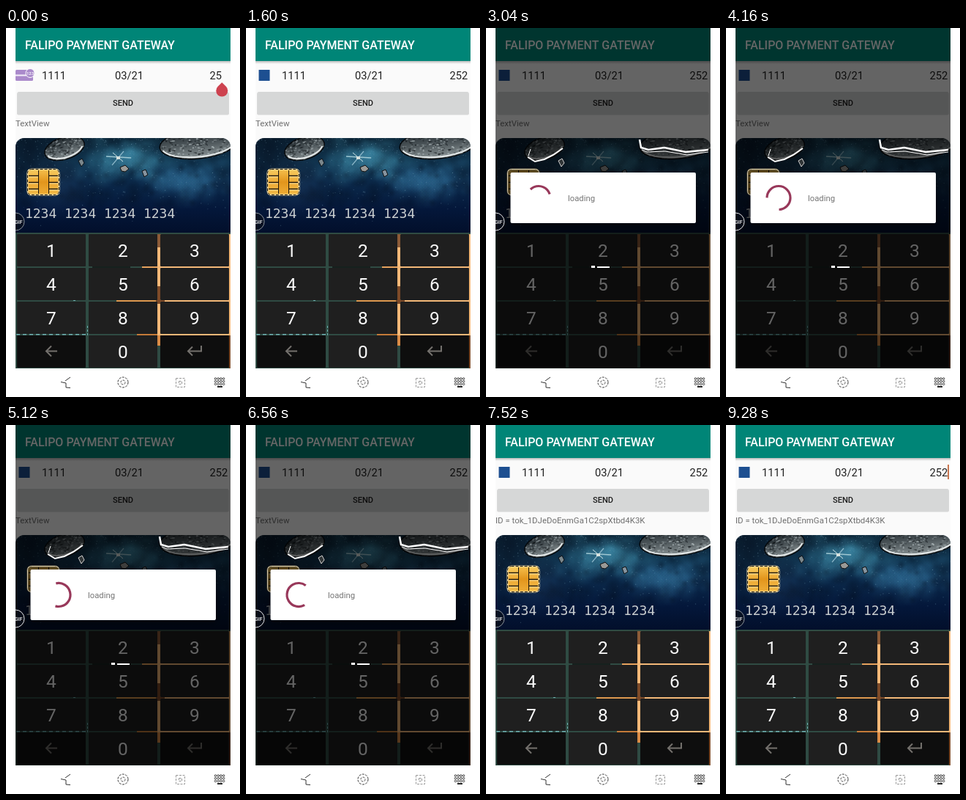
These frames come from a looping animation (320 px wide and 503 px high, 9600 ms). An HTML page with a canvas:

```html
<!DOCTYPE html>
<html lang="en">
<head>
<meta charset="utf-8">
<title>Payment gateway demo</title>
<style>
html, body { margin: 0; width: 100%; height: 100%; overflow: hidden; background: #fff; }
canvas { display: block; width: 320px; height: 503px; }
</style>
</head>
<body>
<canvas id="stage" width="320" height="503"></canvas>
<script>
const ctx = document.getElementById('stage').getContext('2d');
const LOOP = 9600, STEP = 160;
const SPIN_START = 2120, TYPED = 1120, SENT = 2240, DONE = 7200;
const LEFT = 13, WIDTH = 294;
const clamp = v => Math.max(0, Math.min(1, v));

function rect(x, y, w, h, fill, radius = 0) {
  ctx.fillStyle = fill;
  ctx.beginPath();
  ctx.roundRect(x, y, w, h, radius);
  ctx.fill();
}

function text(str, x, y, size, color, { weight = 400, align = 'left', family = 'Roboto, sans-serif' } = {}) {
  ctx.font = `${weight} ${size}px ${family}`;
  ctx.textAlign = align;
  ctx.fillStyle = color;
  ctx.fillText(str, x, y);
}

function trace(points, close) {
  ctx.beginPath();
  points.forEach(([x, y]) => ctx.lineTo(x, y));
  if (close) ctx.closePath();
}

function line(points, color, width = 1, close = false) {
  trace(points, close);
  ctx.strokeStyle = color;
  ctx.lineWidth = width;
  ctx.stroke();
}

function shape(points, fill, outline) {
  trace(points, true);
  ctx.fillStyle = fill;
  ctx.fill();
  ctx.strokeStyle = outline;
  ctx.lineWidth = 1;
  ctx.stroke();
}

function ring(x, y, r, color, width = 1) {
  ctx.beginPath();
  ctx.arc(x, y, r, 0, Math.PI * 2);
  ctx.strokeStyle = color;
  ctx.lineWidth = width;
  ctx.stroke();
}

function glow(x, y, r, rgb, alpha) {
  const g = ctx.createRadialGradient(x, y, 0, x, y, r);
  g.addColorStop(0, `rgba(${rgb},${alpha})`);
  g.addColorStop(1, `rgba(${rgb},0)`);
  ctx.fillStyle = g;
  ctx.fillRect(x - r, y - r, 2 * r, 2 * r);
}

function vertical(y0, y1, ...colors) {
  const g = ctx.createLinearGradient(0, y0, 0, y1);
  colors.forEach((c, i) => g.addColorStop(i / (colors.length - 1), c));
  return g;
}

function randomizer(seed) {
  return () => (seed = (seed * 16807) % 2147483647) / 2147483647;
}

function drawHeader() {
  rect(LEFT, 0, WIDTH, 464, '#fafafa');
  rect(LEFT, 45, WIDTH, 4, vertical(45, 49, 'rgba(0,0,0,.25)', 'rgba(0,0,0,0)'));
  rect(LEFT, 0, WIDTH, 45, '#008577');
  text('FALIPO PAYMENT GATEWAY', 26, 29, 16, '#fff', { weight: 500 });
}

function drawForm(t) {
  const typed = t >= TYPED;
  if (typed) {
    rect(17.5, 57, 15, 15, '#1d4f91');
  } else {
    rect(13, 57, 24, 15, '#aa8acb', 1.5);
    rect(13, 63.5, 15, 2, '#f3eef8');
    ctx.beginPath();
    ctx.arc(33, 61.5, 6, 0, Math.PI * 2);
    ctx.fillStyle = '#aa8acb';
    ctx.fill();
    ring(33, 61.5, 6, '#fff');
    text('123', 33, 63.5, 6, '#fff', { align: 'center', weight: 500 });
  }
  text('1111', 49, 70, 14.7, '#212121');
  text('03/21', 149, 70, 14.7, '#212121');
  text(typed ? '252' : '25', 278.5, 70, 14.7, '#212121');

  rect(15, 88, 290, 30.5, 'rgba(0,0,0,.14)', 2);
  rect(15.5, 87, 289, 30.5, '#d6d7d7', 2);
  text('SEND', 160, 106, 11.1, '#1e1e1e', { weight: 500, align: 'center' });
  text(t >= DONE ? 'ID = tok_1DJeDoEnmGa1C2spXtbd4K3K' : 'TextView', 13, 134, 11.45, '#707070');

  const early = t >= 480 && t < TYPED;
  const late = (t >= TYPED && t < 1600) || (t >= 8160 && t < 8800) || t >= 9280;
  if (early) rect(295, 54, 1.5, 20, '#cd424f');
  if (late) rect(303, 54, 2, 20, '#c8754f');
  if (!typed) {
    ctx.beginPath();
    ctx.arc(295.3, 85.5, 8, -Math.PI / 4, Math.PI * 5 / 4);
    ctx.lineTo(295.3, 74.2);
    ctx.fillStyle = '#cd424f';
    ctx.fill();
  }
}

const smallRock = [[99, 181], [104, 178], [107, 184], [103, 189]];

function drawNebula() {
  rect(LEFT, 150, WIDTH, 129, vertical(150, 279, '#0c2638', '#103550', '#0a2748', '#04173a', '#020f2b'));
  const rnd = randomizer(71);
  const spread = () => (rnd() + rnd() + rnd()) / 1.5 - 1;
  for (let i = 0; i < 120; i++) {
    glow(165 + spread() * 80, 183 + spread() * 38, 5 + rnd() * 13, '70,155,185', .05 + rnd() * .13);
    glow(245 + spread() * 75, 208 + spread() * 34, 5 + rnd() * 13, '55,125,170', .04 + rnd() * .1);
    glow(LEFT + rnd() * WIDTH, 150 + rnd() * 90, 4 + rnd() * 12, '3,14,30', .1 + rnd() * .25);
  }
  glow(30, 170, 75, '6,16,32', .65);
  glow(70, 215, 50, '40,70,110', .3);
  for (let i = 0; i < 520; i++) {
    const x = LEFT + rnd() * WIDTH, y = 150 + rnd() * rnd() * 125;
    rect(x, y, 1, 1, `rgba(150,195,215,${rnd() * .45})`);
  }
}

function drawAsteroid(x, y, rx, ry, tilt, seed) {
  const rnd = randomizer(seed);
  ctx.save();
  ctx.translate(x, y);
  ctx.rotate(tilt);
  ctx.beginPath();
  ctx.ellipse(0, 0, rx, ry, 0, 0, Math.PI * 2);
  ctx.fillStyle = vertical(-ry, ry, '#20282d', '#4e575b', '#8d9698');
  ctx.fill();
  ctx.strokeStyle = '#05080b';
  ctx.lineWidth = 1.5;
  ctx.stroke();
  ctx.clip();
  for (let i = 0; i < rx * 6; i++) {
    const shade = rnd() < .45 ? '8,12,15' : '185,195,198';
    rect((rnd() * 2 - 1) * rx, (rnd() * 2 - 1) * ry, 1 + rnd() * 3, 1 + rnd(), `rgba(${shade},${.2 + rnd() * .5})`);
  }
  ctx.beginPath();
  ctx.ellipse(0, 0, rx - 2.5, ry - 2.5, 0, .35, 2.9);
  ctx.strokeStyle = '#e4e8e8';
  ctx.lineWidth = 2;
  ctx.stroke();
  ctx.restore();
}

function drawChipEdge(color, width = 1) {
  ctx.beginPath();
  ctx.roundRect(29.5, 192.5, 43, 35, 5);
  ctx.strokeStyle = color;
  ctx.lineWidth = width;
  ctx.stroke();
}

function drawChip() {
  rect(29, 192, 44, 36, vertical(192, 228, '#f8cd62', '#eeaa34', '#f2ba48'), 5);
  rect(44, 194, 14, 32, vertical(194, 226, '#f4bd4a', '#e2951c', '#edab35'), 2);
  for (const y of [201.5, 210.5, 219.5]) {
    for (const x of [31, 58]) {
      line([[x, y], [x + 13, y]], '#1c150b', 1.3);
      line([[x, y + 1.5], [x + 13, y + 1.5]], '#fbe3a0');
    }
  }
  line([[44.5, 194], [44.5, 226]], '#1c150b');
  line([[58.5, 194], [58.5, 226]], '#1c150b');
  drawChipEdge('#f7e3ae', 2);
  ctx.setLineDash([4, 2]);
  drawChipEdge('#17130c');
  ctx.setLineDash([]);
}

function drawCard() {
  ctx.save();
  ctx.beginPath();
  ctx.roundRect(LEFT, 150, WIDTH, 129, [12, 12, 0, 0]);
  ctx.clip();
  drawNebula();
  drawAsteroid(80, 164, 28, 15, -.3, 5);
  drawAsteroid(263, 158, 53, 20, -.1, 9);
  shape(smallRock, '#7b878c', '#0a0f14');
  shape([[156, 190], [163, 187], [168, 192], [163, 196], [158, 195]], '#9a9a97', '#111');
  shape([[186, 195], [191, 193], [194, 200], [189, 203]], '#8795a0', '#111');
  line([[137, 175], [171, 177]], '#9ec7d2', 1.6);
  line([[145, 187], [161, 168]], '#8ab6c8', 1.2);
  line([[146, 170], [160, 182]], '#cfe4e7');
  rect(151, 175, 5, 4, '#d7e2df');
  drawChip();
  text('1234 1234 1234 1234', 26, 258.5, 17.95, '#c9cdcf', { family: '"DejaVu Sans Mono", monospace' });
  ctx.restore();
}

function drawBackdrop() {
  const warm = '#f3b878', brown = '#7d4a28';
  rect(LEFT, 279, WIDTH, 185, '#2f4b43');
  rect(207, 281, 100, 138, warm);
  rect(207, 281, 4, 18, '#8c5b38');
  rect(207, 352, 4, 24, brown);
  rect(207, 419, 4, 14, '#d98b46');
  rect(305, 419, 2, 45, brown);
  rect(186, 325, 21, 2, '#e6a25e');
  rect(151, 371, 56, 2, '#dd994f');
  rect(179, 417, 28, 2, '#c47a38');
  rect(205, 371, 12, 2, brown);
  rect(118, 325, 52, 2, '#16211e');
  for (let x = 14; x < 112; x += 9) rect(x, 417, 5, 1.5, '#6fb0b2');
  for (let y = 406; y < 417; y += 5) rect(111, y, 1, 3, '#6fb0b2');
  rect(92, 371, 3, 1, '#6fb0b2');
}

function drawKeypad(t) {
  drawBackdrop();
  const flash = t >= TYPED && t < 1600 ? .2 * (1 - (t - TYPED) / 480) : 0;
  [...'123456789 0 '].forEach((label, i) => {
    const x = 15 + (i % 3) * 98, y = 281 + Math.floor(i / 3) * 46;
    const blank = label === ' ';
    rect(x, y, 94, 44, blank ? '#0e0e0e' : '#1f1f1f', 1);
    if (label === '2' && flash) rect(x, y, 94, 44, `rgba(255,255,255,${flash})`, 1);
    if (!blank) text(label, x + 47, y + 31, 24.5, '#fafafa', { align: 'center' });
  });
  line([[70, 440.5], [55, 440.5]], '#74716d', 2);
  line([[62, 433.5], [55, 440.5], [62, 447.5]], '#74716d', 2);
  line([[267, 433], [267, 440.5], [249, 440.5]], '#74716d', 2);
  line([[255, 434.5], [249, 440.5], [255, 446.5]], '#74716d', 2);
}

function drawNavigation() {
  line([[75, 482.5], [82, 484], [82, 490], [88, 490.5]], '#333');
  line([[81, 481], [88, 476]], '#333');
  ctx.setLineDash([3, 1.5]);
  ring(160, 483, 7, '#333');
  ring(160, 483, 3, '#444');
  ctx.strokeStyle = '#999';
  ctx.strokeRect(232.5, 477.5, 12, 12);
  ctx.strokeRect(236.5, 481.5, 4, 4);
  ctx.setLineDash([]);
  for (let row = 0; row < 3; row++) {
    for (let col = 0; col < 4; col++) ring(286.5 + col * 3.7, 478 + row * 3.7, 1.3, '#222', .8);
  }
  rect(289, 488, 7, 2, '#222');
}

function drawBadge(dim) {
  ctx.save();
  ctx.beginPath();
  ctx.rect(LEFT, 245, 20, 35);
  ctx.clip();
  ctx.beginPath();
  ctx.arc(13, 264, 12, 0, Math.PI * 2);
  ctx.fillStyle = 'rgba(10,16,26,.65)';
  ctx.fill();
  ring(13, 264, 12, dim > .4 ? '#e8e8e8' : '#8b9299');
  text('GIF', 12, 266.5, 7, '#eee', { weight: 500 });
  ctx.restore();
}

// Edges that stay bright while the window is dimmed.
function drawHighlights() {
  line([[57, 176], [67, 182], [80, 179], [92, 173], [105, 164]], '#fff', 2);
  line([[61, 165], [58, 174]], '#fff');
  line([[210, 152], [212, 163], [222, 166], [244, 163], [273, 169], [304, 166]], '#fff', 2.5);
  line([[213, 166], [220, 169], [245, 168], [275, 173], [304, 169]], '#fff');
  line(smallRock, '#ddd', 1, true);
  drawChipEdge('#e8d9b5');
  rect(144, 324, 5, 3, '#fff');
  rect(152, 325, 17, 2, '#fff');
}

// Standard "fast out, slow in" curve: cubic-bezier(.4, 0, .2, 1).
function ease(x) {
  let low = 0, high = 1;
  for (let i = 0; i < 20; i++) {
    const s = (low + high) / 2;
    const bx = 1.2 * s * (1 - s) ** 2 + .6 * s * s * (1 - s) + s ** 3;
    if (bx < x) low = s; else high = s;
  }
  return 3 * low * low - 2 * low ** 3;
}

function drawSpinner(t) {
  const elapsed = t - SPIN_START;
  const phase = (elapsed / 1333) % 1;
  const tail = .75 * ease(clamp(phase * 2 - 1));
  const head = .75 * ease(clamp(phase * 2));
  const turn = elapsed * 2 / 6665 + phase * .25 - .25;
  ctx.beginPath();
  ctx.arc(72, 231.5, 16, (turn + tail) * Math.PI * 2, (turn + Math.max(head, tail + .01)) * Math.PI * 2);
  ctx.strokeStyle = '#98385a';
  ctx.lineWidth = 3.2;
  ctx.stroke();
}

function drawDialog(t) {
  ctx.save();
  ctx.globalAlpha = t < 2400 || t >= DONE ? .5 : 1;
  ctx.shadowColor = 'rgba(0,0,0,.5)';
  ctx.shadowBlur = 8;
  ctx.shadowOffsetY = 3;
  rect(33.5, 197, 253.5, 69, '#fff', 2);
  ctx.shadowColor = 'transparent';
  drawSpinner(t);
  text('loading', 112, 236, 11.3, '#757575');
  ctx.restore();
}

function draw(t) {
  rect(0, 0, 320, 503, '#fff');
  drawHeader();
  drawForm(t);
  drawCard();
  drawKeypad(t);
  drawNavigation();
  const open = t >= SENT;
  const dim = open ? .6 * Math.min(clamp((t - 2140) / 300), clamp((7440 - t) / 320)) : 0;
  if (dim > 0) rect(LEFT, 0, WIDTH, 464, `rgba(0,0,0,${dim})`);
  if (dim > .4) drawHighlights();
  drawBadge(dim);
  if (open && t < DONE + STEP) drawDialog(t);
}

const origin = performance.now();
let shown = -1;
function tick() {
  const t = Math.floor((performance.now() - origin) % LOOP / STEP) * STEP;
  if (t !== shown) draw(shown = t);
  requestAnimationFrame(tick);
}
tick();
</script>
</body>
</html>
```
